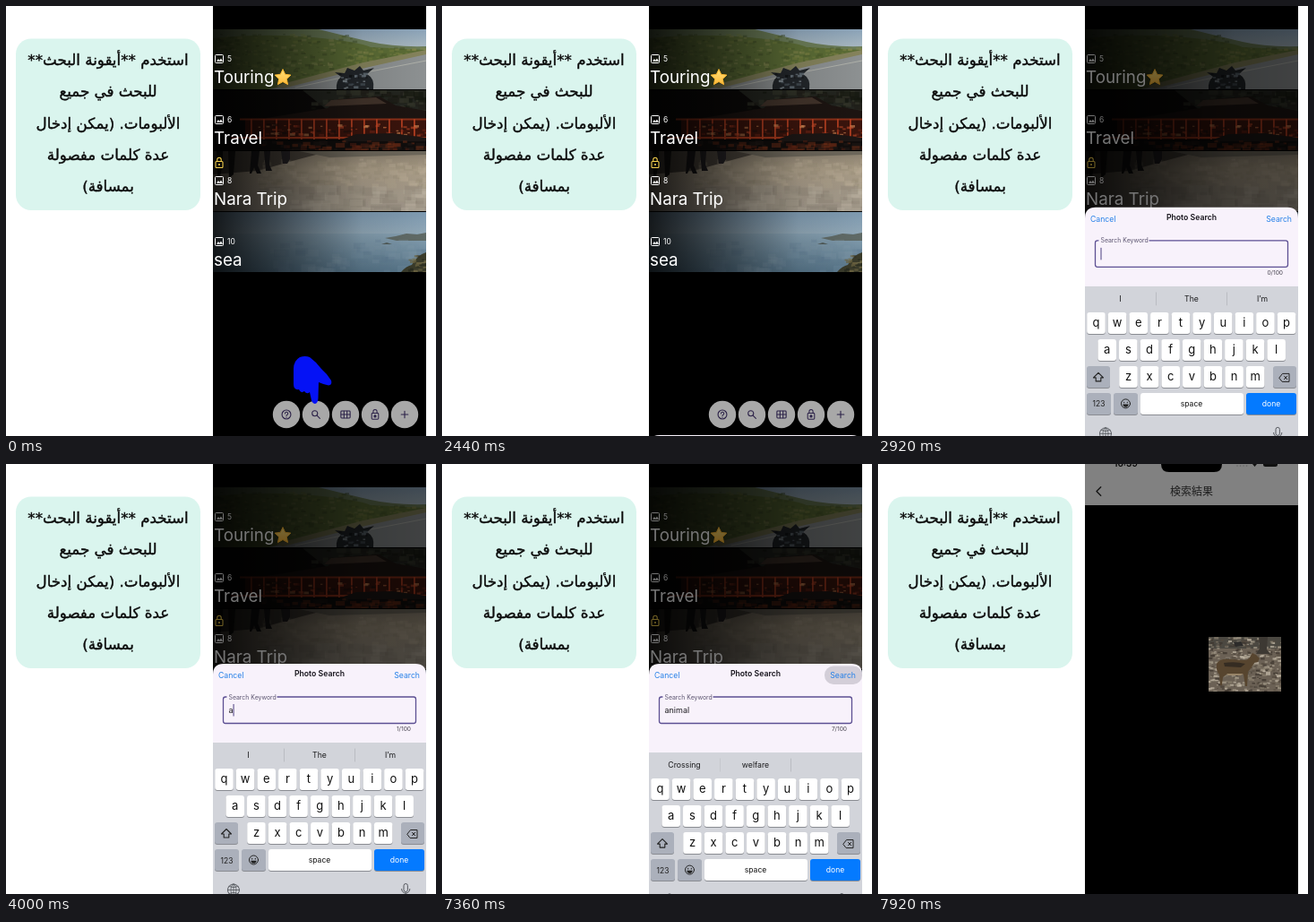
An HTML page for the animation above (8 s loop, 480 px wide and 480 px high).

```html
<!DOCTYPE html>
<html lang="ar">
<head>
<meta charset="utf-8">
<title>Album search</title>
<style>
html,body{margin:0;width:100%;height:100%;overflow:hidden;background:#fff}
svg{display:block;width:100%;height:100%}
text{font-family:Inter,Roboto,sans-serif;white-space:pre}
.tip{font:500 16.7px "DejaVu Sans",sans-serif;direction:rtl;text-anchor:middle;fill:#0c0c0c;stroke:#0c0c0c;stroke-width:.4}
.mid{text-anchor:middle}
.line{fill:none;stroke-linecap:round;stroke-linejoin:round}
</style>
</head>
<body>
<svg id="stage" viewBox="0 0 480 480" xmlns="http://www.w3.org/2000/svg"></svg>
<script>
const LOOP = 8000;
const stage = document.getElementById('stage');
const clamp = x => Math.max(0, Math.min(1, x));
const span = (t, from, len) => clamp((t - from) / len);
const out = p => 1 - (1 - p) * (1 - p);
const smooth = p => p * p * (3 - 2 * p);

let seed = 7;
const rnd = () => (seed = (seed * 16807) % 2147483647) / 2147483647;

const rect = (x, y, w, h, fill, r = 0, more = '') =>
  `<rect x="${x}" y="${y}" width="${w}" height="${h}" rx="${r}" fill="${fill}" ${more}/>`;
const path = (d, fill, more = '') => `<path d="${d}" fill="${fill}" ${more}/>`;
const line = (d, color, w, more = '') =>
  `<path class="line" d="${d}" stroke="${color}" stroke-width="${w}" ${more}/>`;
const text = (x, y, size, fill, str, more = '') =>
  `<text x="${x}" y="${y}" font-size="${size}" fill="${fill}" ${more}>${str}</text>`;
const group = (id, body, more = '') => `<g id="${id}" ${more}>${body}</g>`;
const grad = (id, stops, dir = 'x2="0" y2="1"') =>
  `<linearGradient id="${id}" ${dir}>${stops.map(([o, c, a = 1]) =>
    `<stop offset="${o}" stop-color="${c}" stop-opacity="${a}"/>`).join('')}</linearGradient>`;

// Scattered flecks that give a photo its grain
function flecks(n, x, y, w, h, colors, size, alpha) {
  let s = '';
  for (let i = 0; i < n; i++) {
    const fw = size * (.5 + rnd());
    s += rect((x + rnd() * w).toFixed(1), (y + rnd() * h).toFixed(1), fw.toFixed(1),
      (fw * .5).toFixed(1), colors[Math.floor(rnd() * colors.length)], 0, `opacity="${alpha}"`);
  }
  return s;
}

// Photos, drawn in a 238 x 67 box
function touring() {
  return rect(0, 0, 238, 67, 'url(#sky)') +
    path('M0 0H118Q150 8 176 14T238 19V67H0Z', '#6c7d58') +
    path('M0 10Q60 4 112 9T176 20L238 23V67H0Z', '#5c6d36') +
    flecks(260, 0, 5, 160, 50, ['#4a5a2a', '#76803f', '#8a8d55', '#3c4a24'], 4, .45) +
    flecks(90, 150, 20, 88, 18, ['#4a5a2a', '#76803f', '#88894f'], 4, .5) +
    path('M62 67L120 54L170 40L238 27V67Z', '#8d9192') +
    path('M70 63L168 37L238 23V28L170 43L78 66Z', '#85835c') +
    line('M92 65L176 47L238 35', '#b9bab2', .8) +
    path('M138 67Q137 58 143 53L136 48L147 49L150 43L158 46L164 41L168 46L180 43L172 50Q181 55 179 67Z', '#22262a') +
    flecks(26, 140, 48, 36, 18, ['#69757d', '#0f1215', '#454e56', '#8d989e'], 4, .8);
}

function travel() {
  let s = rect(0, 0, 238, 67, '#0c0a09') +
    path('M100 0H238V24H130Z', '#23251f') +
    flecks(90, 105, 0, 133, 22, ['#15180f', '#34352a', '#201f19'], 8, .7) +
    path('M60 31L128 20L140 10L186 7L204 17L238 23V34H60Z', '#1c1411') +
    path('M132 11L182 8L194 15L124 18Z', '#41332a') +
    rect(36, 33, 202, 22, '#3a140c') + rect(30, 31.5, 208, 2, '#8c3019') +
    rect(20, 52, 218, 2, '#a2371b');
  for (let x = 42; x < 238; x += 14) s += rect(x, 32, 1.8, 23, '#b03e20');
  return s + flecks(80, 50, 37, 188, 13, ['#c04a28', '#1c100c', '#d88d58', '#6f2414'], 4, .6) +
    path('M146 54L160 49L200 48L238 53V59H146Z', '#1c1614') +
    rect(0, 57, 238, 10, '#100d0c') +
    flecks(70, 50, 56, 188, 10, ['#5c2213', '#231a16', '#7a3219'], 7, .5);
}

function nara() {
  return rect(0, 0, 238, 67, 'url(#stone)') +
    path('M0 0H130L96 9L50 22L0 26Z', '#4f483f') +
    path('M96 0H238V4L130 7Z', '#6d675b') +
    flecks(150, 50, 8, 188, 30, ['#b3a68f', '#968a76', '#c0b49d'], 8, .3) +
    flecks(90, 50, 38, 188, 28, ['#8a8172', '#a79e8e', '#bdb4a3'], 15, .35) +
    path('M4 0H11L11 14L8 28H5Z', '#151412') + path('M17 0H25L23 26L18 30Z', '#191715') +
    path('M43 0H52L50 16L54 25H49L46 18L43 25H41Z', '#191719') +
    path('M57 0H64L63 15L66 22H59Z', '#211f21') +
    path('M76 0H86V9L83 14H78Z', '#2a272a');
}

function sea() {
  return rect(0, 0, 238, 67, 'url(#seaSky)') +
    rect(0, 24, 238, 43, 'url(#water)') +
    path('M192 29L204 27L216 24L228 25L238 23V32H205Z', '#606a66') +
    flecks(80, 60, 30, 178, 36, ['#7590a2', '#5b7a8e', '#8199a7'], 12, .25) +
    path('M188 36L194 34L200 36Z', '#515a58') +
    path('M210 67Q216 60 222 59Q228 48 238 45V67Z', '#3a3b2a') +
    flecks(30, 218, 48, 19, 19, ['#6b6340', '#25281d', '#77704c'], 4, .7);
}

const imageIcon = (y, c = '#fff') =>
  `<rect x="233.5" y="${y}" width="9" height="9" rx="1" fill="none" stroke="${c}"/>` +
  path(`M235 ${y + 7.3}L237 ${y + 4.6}L238.4 ${y + 6.2}L240 ${y + 4}L242 ${y + 7.3}Z`, c);

const lock = (x, y, c) =>
  `<rect x="${x - 4}" y="${y - 1.5}" width="8" height="7" rx="1" class="line" stroke="${c}" stroke-width="1.1"/>` +
  line(`M${x - 2.2} ${y - 2}V${y - 3.5}a2.2 2.2 0 0 1 4.4 0V${y - 2}`, c, 1.1) +
  `<circle cx="${x}" cy="${y + 2}" r="1.1" fill="${c}"/>`;

function album(i, photo, name, count) {
  const y = 26 + 68 * i;
  return `<svg x="231" y="${y}" width="238" height="67" viewBox="0 0 238 67">${photo}` +
    rect(0, 0, 238, 67, 'url(#shade)') + '</svg>' +
    imageIcon(y + 28.5) +
    text(247, y + 36, 8.5, '#fff', count) +
    text(232, y + 60, 18.8, '#fff', name);
}

function star(x, y, r) {
  let d = '';
  for (let k = 0; k < 10; k++) {
    const a = k * Math.PI / 5 - Math.PI / 2, q = k % 2 ? r * .48 : r;
    d += (k ? 'L' : 'M') + (x + q * Math.cos(a)).toFixed(2) + ' ' + (y + q * Math.sin(a)).toFixed(2);
  }
  return path(d + 'Z', 'url(#gold)', 'stroke="#fbb62f" stroke-linejoin="round"');
}

function buttons() {
  const ink = '#2b2148';
  const icons = [
    '<circle r="5.2" class="line"/>' + '<path class="line" d="M-1.6-1.2a1.7 1.7 0 1 1 2.4 1.6q-.8.4-.8 1.2M0 3.2v.1"/>',
    '<circle cx="-1.3" cy="-1.3" r="3.2" class="line"/><path class="line" d="M1.2 1.2L4.6 4.6"/>',
    '<rect x="-5.4" y="-4.2" width="10.8" height="8.4" rx="1" class="line"/><path class="line" d="M-1.8-4V4M1.8-4V4M-5 0H5"/>',
    lock(0, 0, ink),
    '<path class="line" d="M-4 0H4M0-4V4"/>'
  ];
  return icons.map((icon, k) => `<g transform="translate(${313 + 33 * k} 456)"><circle r="15.2" fill="#a8a8a8"/>` +
    `<g transform="scale(.95)" stroke="${ink}" stroke-width="1.15">${icon}</g></g>`).join('');
}

const hand = path('M321 405Q321 396 328 392Q334 390 339 392Q346 397 352 405Q359 411 363 418Q364.5 423 360 423.5' +
  'Q354 422 349 420L348.5 438Q348 444 344.5 444Q341 443 340.5 438L339 431Q336 434 333 430Q329 433 327 428Q321 429 321 422Z', '#0512f5');

function keyboard() {
  const key = (x, y, w, fill = '#fff') => rect(x, y + 1, w, 24, '#8a8c92', 3) + rect(x, y, w, 24, fill, 3);
  const row = (letters, cx, y) => [...letters].map((c, i) => {
    const x = cx + 23.62 * i;
    return key(x - 10.3, y, 20.6) + text(x, y + 16.3, 13, '#111', c, 'class="mid"');
  }).join('');
  const dark = '#abb0bb', ink = '#222';
  return rect(231, 311, 238, 260, '#d2d4da') + group('words', '') +
    row('qwertyuiop', 243.5, 340) + row('asdfghjkl', 255.7, 370) + row('zxcvbnm', 279.5, 400) +
    key(233, 400, 26, dark) + key(441, 400, 26, dark) +
    line('M246 407.5L251.5 413H248.8V417H243.2V413H240.5Z', ink, 1.1) +
    line('M448 413L451.5 408.5H459V417.5H451.5ZM453.5 411.2L456.7 414.8M456.7 411.2L453.5 414.8', ink, 1) +
    key(233, 430, 27, dark) + text(246.5, 445.5, 8.5, ink, '123', 'class="mid"') +
    key(263, 430, 27, dark) +
    `<circle cx="276.5" cy="442" r="5" class="line" stroke="${ink}"/>` +
    line('M274.7 440.3v.6M278.3 440.3v.6', ink, 1.1) + path('M273.4 442.7h6.2a3.1 3.1 0 0 1-6.2 0Z', ink) +
    key(293, 430, 115) + text(350, 445.2, 8.6, '#111', 'space', 'class="mid"') +
    key(411, 430, 56, '#047aff') + text(439, 445.2, 8.6, '#fff', 'done', 'class="mid"') +
    line('M247.5 475.5h13M254 469v13M249 471.5q5 2.5 10 0M249 479.5q5-2.5 10 0', '#55585e', .8) +
    '<circle cx="254" cy="475.5" r="6.5" class="line" stroke="#55585e"/>' +
    '<ellipse cx="254" cy="475.5" rx="3" ry="6.5" class="line" stroke="#55585e" stroke-width=".8"/>' +
    rect(444, 468.5, 4.4, 9, 'none', 2.2, 'stroke="#55585e"') +
    line('M441.6 474.5a4.6 4.6 0 0 0 9.2 0M446.2 479v3', '#55585e', 1);
}

// Sheet at its resting place, top edge at 223
function sheet() {
  const blue = '#2680e8';
  return path('M231 490V235Q231 223 243 223H457Q469 223 469 235V490Z', '#f8f2fb') +
    rect(427, 225.5, 42, 20.5, '#d3ced8', 10, 'id="pill"') +
    text(237, 239, 8.7, blue, 'Cancel') +
    text(350, 237.3, 8.7, '#15131a', 'Photo Search', 'class="mid" font-weight="600"') +
    text(462, 239, 8.7, blue, 'Search', 'text-anchor="end"') +
    line('', '#5c4f93', 1.3, 'id="field"') +
    text(248.5, 262.5, 6.9, '#5c5570', 'Search Keyword', 'id="label"') +
    text(248.5, 278, 9, '#1d1b20', '', 'id="typed"') +
    rect(0, 268, 1, 13.5, '#4b3f80', 0, 'id="caret"') +
    text(452, 298.3, 6.6, '#4a4652', '', 'id="count" text-anchor="end"');
}

function results() {
  return rect(231, 0, 238, 480, '#000') +
    rect(231, 0, 238, 46, '#818181') +
    path('M316 0H384Q384 9 375 9H325Q316 9 316 0Z', '#000') +
    text(276.5, 3.4, 10, '#0a0a0a', '16:39', 'class="mid" font-weight="600"') +
    line('M401 2h.1M404.5 2h.1M408 2h.1M411.5 2h.1', '#666', 1.6) +
    path('M418 0H423L420.5 3Z', '#111') + rect(430, -5, 16, 8, '#111', 2.5) +
    line('M248.7 25.8L244 30.5L248.7 35.2', '#161616', 1.4) +
    `<text x="350" y="34.6" font-size="12" fill="#1d1d1d" class="mid" style="font-family:'Noto Sans CJK JP','Noto Sans CJK',sans-serif">検索結果</text>`;
}

function deer() {
  return '<svg x="369" y="193" width="81" height="61" viewBox="0 0 81 61">' +
    rect(0, 0, 81, 61, '#6b6155') + rect(0, 0, 81, 13, '#4b4841') +
    flecks(430, -2, 0, 83, 61, ['#aaa08d', '#3a332b', '#8b8070', '#c4baa8', '#554b3f'], 3.5, .7) +
    path('M56 0H66L65 14L69 19H53L57 13Z', '#3d3933') +
    path('M28 6L36 5L39 10L30 11Z', '#2c2b2a') +
    path('M9 30Q12 24 24 25L40 26Q45 26 47 21L49 18L53 20L57 24L55 28L51 29Q47 36 44 39L43 55H41L39 42L20 42L16 45L15 54H13L12 42Q8 38 9 30Z', '#57452f') +
    path('M17 29Q30 27 41 30L36 34L18 33Z', '#352c22') + path('M20 41L39 41L36 43L22 43Z', '#978468') + '</svg>';
}

const tip = ['استخدم **أيقونة البحث**', 'للبحث في جميع', 'الألبومات. (يمكن إدخال', 'عدة كلمات مفصولة', 'بمسافة)'];

stage.innerHTML = '<defs>' +
  grad('sky', [[0, '#8ba3b8'], [.4, '#b3bfc4']]) +
  grad('stone', [[0, '#877c6c'], [.3, '#a99c86'], [1, '#a0968a']]) +
  grad('seaSky', [[0, '#7d99b0'], [.4, '#93a9b7']]) +
  grad('water', [[0, '#86a0b1'], [1, '#567488']]) +
  grad('gold', [[0, '#ffe27a'], [1, '#fdb93a']]) +
  grad('shade', [[0, '#000', .85], [.3, '#000', .55], [.7, '#000', .1], [1, '#000', 0]], 'x2="1"') +
  '<clipPath id="screen"><rect x="231" y="0" width="238" height="480"/></clipPath></defs>' +
  rect(11, 36.5, 206, 191.5, '#daf5ee', 17) +
  tip.map((s, i) => `<text class="tip" x="114" y="${66 + 35.3 * i}">${s}</text>`).join('') +
  '<g clip-path="url(#screen)">' + rect(231, 0, 238, 480, '#000') +
  album(0, touring(), 'Touring', 5) + star(309, 80, 9.4) +
  album(1, travel(), 'Travel', 6) + album(2, nara(), 'Nara Trip', 8) + lock(238, 175, '#f3cf4e') +
  album(3, sea(), 'sea', 10) + buttons() + group('hand', hand) +
  rect(231, 0, 238, 480, '#000', 0, 'id="dim"') +
  group('sheet', sheet()) + group('keys', keyboard()) +
  group('results', results()) + group('deer', deer()) + '</g>';

const $ = Object.fromEntries([...stage.querySelectorAll('[id]')].map(e => [e.id, e]));
const set = (e, k, v) => e.setAttribute(k, v);
const shift = (e, y) => set(e, 'transform', `translate(0 ${y.toFixed(2)})`);

const strokes = [3960, 4240, 4480, 4720, 4920, 5120, 5400];
const phrase = 'animal ';
const hints = [
  [2900, 'I', 'The', 'I’m'], [4080, '“a”', 'and', 'are'], [4320, '“an”', 'and', 'any'],
  [4560, '“ani”', 'animal', 'anime'], [4800, '“anim”', 'animal', 'anime'],
  [5200, 'animal', 'animals', 'animated'], [5440, 'Crossing', 'welfare', '*'], [6640, 'Crossing', 'welfare', '']
];

// Giraffe, zebra and buffalo
const herd =
  line('M400 320.5L403 322L405 327L407 331M405 327L404 331', '#c98a35', 1.7) +
  line('M425 323L428 322L430 325H434V330M429 325V330M427 321v2', '#444', 1.6) +
  path('M451 326Q453 321 459 323L462 326L460 329H453Z', '#6b4a32') + line('M454 328v2.5M459 328v2.5', '#4b3423', 1.4);

function words(t) {
  let s = line('M389.5 318V332', '#b4b6bc', .8);
  const hint = hints.filter(h => t >= h[0]).pop();
  if (!hint) return s;
  const [start, a, b, c] = hint;
  const word = (x, w, o = 1) => text(x, 328, 8.7, '#1b1b1d', w, `class="mid" opacity="${o}"`);
  s += line('M310.5 318V332', '#b4b6bc', c === 'I’m' ? .8 : .4);
  const fade = start === 5440 ? (.2 + .8 * span(t, 5440, 160)).toFixed(2) : 1;
  return s + word(270.5, a, fade) + word(350, b) + (c === '*' ? herd : word(429, c));
}

function pulse(t) {
  if (t < 520 || t > 1320) return 1;
  return t < 1040 ? 1 + .2 * Math.sin(Math.PI * (t - 520) / 520)
    : 1 - .06 * Math.sin(Math.PI * (t - 1040) / 280);
}

let lastWords = '';
function draw(t) {
  set($.hand, 'transform', `translate(342.5 417.5) scale(${pulse(t).toFixed(3)}) translate(-342.5 -417.5)`);
  set($.hand, 'opacity', 1 - span(t, 1320, 160));

  set($.dim, 'opacity', .54 * smooth(span(t, 2440, 320)));

  const rise = out(span(t, 2440, 180));
  const lift = out(span(t, 2608, 350));
  const drop = smooth(span(t, 7315, 300));
  const leave = smooth(span(t, 7380, 240));
  shift($.keys, 169 * (1 - lift) + 175 * drop);
  shift($.sheet, (1 - rise) * 91 + (1 - lift) * 166 + 260 * leave);

  const float = smooth(span(t, 2560, 178));
  const gap = 246 + 57 * float;
  set($.field, 'd', `M246 260H245Q242.5 260 242.5 262.5V287Q242.5 289.5 245 289.5H455Q457.5 289.5 457.5 287V262.5Q457.5 260 455 260H${gap.toFixed(1)}`);
  set($.label, 'y', 277.5 - 15 * float);

  const n = strokes.filter(s => t >= s).length;
  $.typed.textContent = phrase.slice(0, n);
  $.count.textContent = n + '/100';
  set($.caret, 'x', n ? 248.5 + $.typed.getComputedTextLength() : 248.5);
  const lastKey = strokes[n - 1] || 2560;
  const beat = (t - lastKey) % 1000;
  set($.caret, 'opacity', t < 2560 || t > 7200 ? 0 : 1 - span(beat, 450, 100) + span(beat, 900, 100));
  set($.pill, 'opacity', span(t, 7200, 120));

  const w = words(t);
  if (w !== lastWords) $.words.innerHTML = lastWords = w;

  set($.results, 'opacity', smooth(span(t, 7390, 220)));
  const grow = out(span(t, 7740, 180));
  set($.deer, 'opacity', grow);
  set($.deer, 'transform', `translate(409.5 223.5) scale(${.6 + .4 * grow}) translate(-409.5 -223.5)`);
}

const begin = performance.now();
function tick() {
  draw((performance.now() - begin) % LOOP);
  requestAnimationFrame(tick);
}
draw(0);
requestAnimationFrame(tick);
</script>
</body>
</html>
```
